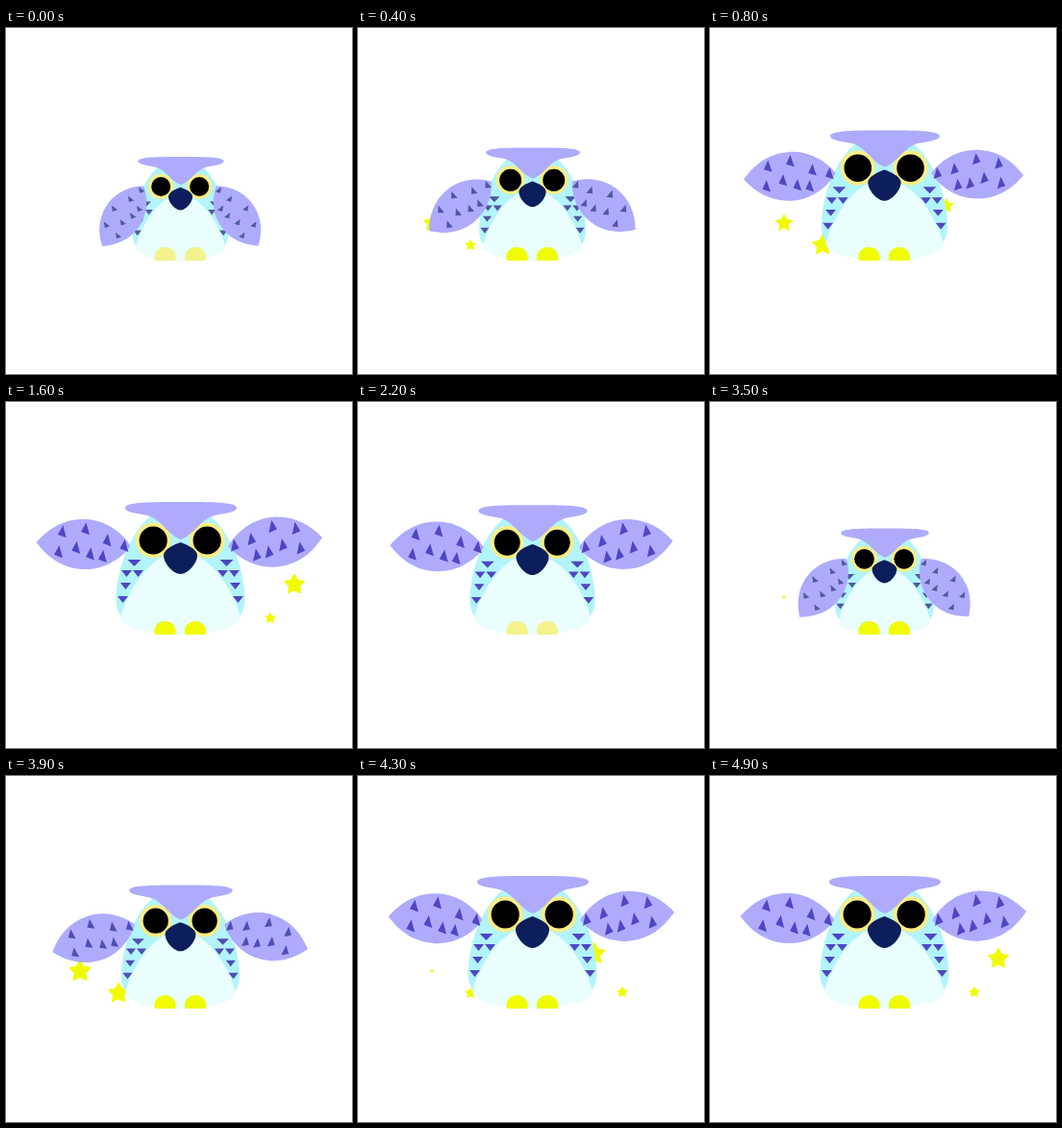
An HTML page for the animation above (5000 ms loop, 360 by 360 pixels).

```html
<!DOCTYPE html>
<html lang="en">
<head>
<meta charset="utf-8">
<title>Flapping owl</title>
<style>
  html, body { margin: 0; width: 100%; height: 100%; overflow: hidden; background: #fff; }
  svg { display: block; width: 100%; height: 100%; }
</style>
</head>
<body>
<svg id="stage" viewBox="0 0 360 360"></svg>
<script>
const LOOP = 5000, CYCLE = 3300, STEP = 100;
const LILAC = '#aeabfd', AQUA = '#b2f4fb', RING = '#fbee84', PALE = '#f4f28a', BRIGHT = '#f1fb00';
const stage = document.getElementById('stage');

function add(parent, tag, attrs = {}) {
  const el = document.createElementNS('http://www.w3.org/2000/svg', tag);
  for (const k in attrs) el.setAttribute(k, attrs[k]);
  parent.appendChild(el);
  return el;
}
const path = (parent, d, fill) => add(parent, 'path', fill ? { d, fill } : { d });
const group = parent => add(parent, 'g');
const place = (el, ...ops) => el.setAttribute('transform', ops.join(' '));
const mix = (a, b, p) => a + (b - a) * p;
const clamp = x => Math.min(1, Math.max(0, x));
const ease = x => x < 0.5 ? 2 * x * x : 1 - 2 * (1 - x) * (1 - x);
const ramp = (t, from, to) => ease(clamp((t - from) / (to - from)));

// Stars: x, y, time of greatest size
const STARS = [[77, 203, 600], [117, 226, 700], [246, 185, 1050], [275, 225, 1300], [300, 190, 1500]];
const STAR_LIFE = 900, STAR_SIZE = 12;
const starPoints = Array.from({ length: 10 }, (_, i) => {
  const a = i * Math.PI / 5, r = i % 2 ? 0.48 : 0.93;
  return (r * Math.sin(a)).toFixed(3) + ',' + (-r * Math.cos(a)).toFixed(3);
}).join(' ');
const stars = STARS.map(([x, y, peak]) => ({
  x, y, peak,
  el: add(stage, 'polygon', {
    points: starPoints, fill: BRIGHT, stroke: BRIGHT, 'stroke-width': 0.14, 'stroke-linejoin': 'round'
  })
}));

// Body, drawn upwards from the ground line
const body = group(stage);
path(body, 'M0-135C44-135 67-74 67-36C67-8 34 0 0 0C-34 0-67-8-67-36C-67-74-44-135 0-135Z', AQUA);
path(body, 'M0-86C30-86 54-48 62-20C65-7 32 0 0 0C-32 0-65-7-62-20C-54-48-30-86 0-86Z', '#e9fefd');
const bodyMarks = group(body);
for (const side of [-1, 1])
  for (const [x, y, w] of [[48, -78, 7], [44, -67, 5.5], [56, -67, 5.5], [57, -54, 5.5], [60, -40, 5.5]])
    path(bodyMarks, `M${side * x - w} ${y}h${2 * w}l${-w} 7z`);

const WING_MARKS = [[-72, -12], [-48, -16], [-25, -5], [-7, 0], [-75, 9], [-57, 4], [-42, 10], [-29, 12]];
function makeWing() {
  const el = group(stage);
  path(el, 'M0 0C-6-10-24-26-48-26C-70-26-86-15-98 0C-86 15-70 26-48 26C-24 26-6 10 0 0Z', LILAC);
  const marks = group(el);
  const spots = WING_MARKS.map(([x, y]) => ({ x, y, el: path(marks, 'M1-7l4 13l-9-3z') }));
  return { el, marks, spots };
}
const left = makeWing(), right = makeWing();

function poseWing(wing, x, y, angle, sx, sy, open) {
  place(wing.el, `translate(${x} ${y})`, `rotate(${angle})`, `scale(${sx} ${sy})`);
  for (const s of wing.spots)
    place(s.el, `translate(${s.x} ${s.y})`, `rotate(${mix(20, 0, open)})`, `scale(${mix(0.75, 1, open)})`);
}

const eyes = [-1, 1].map(side => ({
  side,
  ring: add(stage, 'circle', { fill: RING }),
  pupil: add(stage, 'circle', { fill: '#000' })
}));
const brow = path(stage, 'M-58 6C-58 0-30 0 0 0C30 0 58 0 58 6C58 11 44 12 35 14' +
  'C20 18 14 34 0 39C-14 34-20 18-35 14C-44 12-58 11-58 6Z', LILAC);
const beak = path(stage, 'M0-17C6-15 17-10 17.5-4C18 4 8 16 0 16C-8 16-18 4-17.5-4C-17-10-6-15 0-17Z', '#0d1e5d');
const feet = [165.5, 197].map(x => {
  const foot = path(stage, 'M-9 14Q-12 14-11 9C-9-3 9-3 11 9Q12 14 9 14Z');
  place(foot, `translate(${x} 228)`);
  return foot;
});

function setCircle(el, x, y, r) {
  el.setAttribute('cx', x);
  el.setAttribute('cy', y);
  el.setAttribute('r', r);
}

function draw(time) {
  const t = time % CYCLE;
  const rise = ramp(t, 0, 1000);
  const p = rise - ramp(t, 1960, 3000);
  const gaze = rise - ramp(t, 1900, 2750);
  const w = t < 3100 ? ramp(t, 0, 1040) - ramp(t, 2100, 3200) : 0;

  let sparkling = false;
  for (const s of stars) {
    const r = STAR_SIZE * Math.cos(clamp(Math.abs(t - s.peak) / STAR_LIFE) * Math.PI);
    const shown = r > 0.1;
    s.el.style.display = shown ? '' : 'none';
    if (shown) {
      sparkling = true;
      place(s.el, `translate(${s.x} ${s.y})`, `scale(${r})`);
    }
  }

  place(body, 'translate(181.5 242)', `scale(${mix(0.745, 1, p)} ${mix(0.79, 1, p)})`);
  const size = mix(0.775, 1, w), y = mix(164.5, 150, p);
  poseWing(left, mix(143, 129.5, p), y, mix(-55.5, 2.3, w), size, size, w);
  poseWing(right, mix(219, 231.5, p), y, mix(55, -5.2, w), -size, size, w);

  const ink = `rgb(${mix(80, 79, w)},${mix(92, 70, w)},${mix(152, 196, w)})`;
  for (const m of [bodyMarks, left.marks, right.marks]) m.setAttribute('fill', ink);

  for (const e of eyes) {
    const x = 181.2 + e.side * mix(20, 28, gaze), ey = mix(165, 144, p);
    setCircle(e.ring, x, ey, mix(13, 18.5, gaze));
    setCircle(e.pupil, x, ey, mix(10, 14.6, gaze));
  }
  place(brow, `translate(182 ${mix(134, 104, p)})`, `scale(${mix(0.77, 1, p)} ${mix(0.75, 1, p)})`);
  place(beak, `translate(181.5 ${mix(178, 163, p)})`, `scale(${mix(0.715, 1, p)})`);
  for (const f of feet) f.setAttribute('fill', sparkling ? BRIGHT : PALE);
}

const start = performance.now();
function tick() {
  const t = (performance.now() - start) % LOOP;
  draw(Math.floor(t / STEP) * STEP);
  requestAnimationFrame(tick);
}
tick();
</script>
</body>
</html>
```
